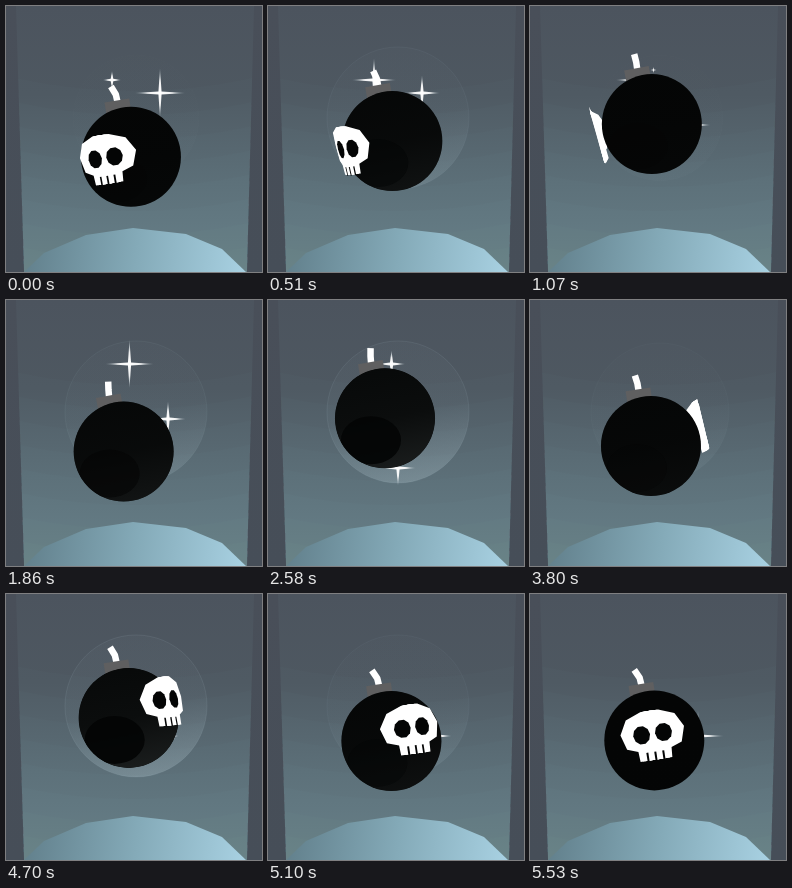
An HTML page with a canvas that plays this animation: 256x266 px, repeating every 5550 ms.

```html
<!DOCTYPE html>
<html>
<head>
<meta charset="utf-8">
<style>
html, body { margin: 0; width: 100%; height: 100%; overflow: hidden; background: #484f59; }
canvas { display: block; }
</style>
</head>
<body>
<canvas id="stage" width="256" height="266"></canvas>
<script>
const ctx = document.getElementById('stage').getContext('2d');
const LOOP = 5550, RAD = Math.PI / 180, BLACK = '#040505';
const wave = degrees => Math.cos(degrees * RAD);

// x, y, time of full brightness
const sparkles = [[154, 87, .1], [106, 74, .75], [162, 119, 1.45], [123.5, 64, 2], [130, 168, 3], [168, 142, 5.6]];

// Right half of the skull, mirrored for the left
const half = [[9, -31], [24.5, -25], [32, -11], [27.5, 4], [16.7, 8], [16, 18]];
const skull = [...half, ...half.map(([u, v]) => [-u, v]).reverse()];

function poly(points, fill) {
  ctx.beginPath();
  points.forEach(p => ctx.lineTo(...p));
  ctx.closePath();
  ctx.fillStyle = fill;
  ctx.fill();
}

function oval(x, y, rx, ry, fill) {
  ctx.beginPath();
  ctx.ellipse(x, y, rx, ry, 0, 0, 7);
  ctx.fillStyle = fill;
  ctx.fill();
}

function gradient(x0, y0, x1, y1, ...colors) {
  const g = ctx.createLinearGradient(x0, y0, x1, y1);
  colors.forEach((c, i) => g.addColorStop(i / (colors.length - 1), c));
  return g;
}

function drawRoom() {
  ctx.fillStyle = gradient(0, 0, 0, 266, '#494f59', '#464e58');
  ctx.fillRect(0, 0, 256, 266);
  ctx.save();
  poly([[10, 0], [248, 0], [241, 266], [18, 266]], gradient(0, 0, 0, 266, '#4c545e', '#4e5861', '#586770', '#61737c'));
  ctx.clip();
  ctx.fillStyle = 'rgba(140,175,190,.02)';
  for (let y = 70; y < 250; y += 24) {
    ctx.beginPath();
    ctx.moveTo(0, y);
    ctx.quadraticCurveTo(128, y + 30, 256, y);
    ctx.lineTo(256, 266);
    ctx.lineTo(0, 266);
    ctx.fill();
  }
  ctx.restore();
  poly([[18, 266], [38, 247], [80, 229], [127, 222], [180, 228], [216, 243], [240, 266]],
    gradient(20, 235, 240, 262, '#62808c', '#84aab8', '#a8d1e2'));
}

function drawBubble(glow) {
  const r = 60 + 11 * Math.min(1, glow * 3);
  ctx.globalAlpha = glow;
  oval(130, 112, r, r, gradient(115, 42, 140, 184, 'rgba(190,215,225,.03)', 'rgba(190,215,225,.04)', 'rgba(200,220,228,.28)'));
  ctx.strokeStyle = 'rgba(190,210,220,.1)';
  ctx.lineWidth = 1;
  ctx.stroke();
  ctx.globalAlpha = 1;
}

function drawSparkle([x, y, peak], t) {
  const s = 27 * Math.max(0, 1 - Math.abs(t - peak)) ** .8;
  if (!s) return;
  const g = ctx.createRadialGradient(x, y, 0, x, y, s);
  g.addColorStop(0, '#fff');
  g.addColorStop(.5, 'rgba(255,255,255,.9)');
  g.addColorStop(1, 'rgba(220,235,240,.3)');
  const waist = Math.min(2.2, s * .2);
  const star = Array.from({ length: 8 }, (_, i) => {
    const r = i % 2 ? waist : s;
    return [x + r * wave(i * 45), y + r * wave(i * 45 - 90)];
  });
  poly(star, g);
}

// A curved plate riding on the ball
function drawSkull(spin) {
  const sin = Math.sin(spin), cos = Math.cos(spin);
  const wrap = ([u, v]) => {
    const across = u - v * .09, depth = 55.5 - across * across / 108;
    return [depth * sin + across * cos, v + u * .09 + 1 - 3 * sin];
  };
  const ring = x => Array.from({ length: 10 }, (_, i) =>
    wrap([x + 8.5 * wave(i * 36), -8 + 9.2 * wave(i * 36 - 90)]));

  ctx.strokeStyle = '#fff';
  ctx.lineWidth = 1.5;
  for (let k = 1; k > 0; k -= .15) {
    poly(skull.map(([u, v]) => wrap([u * k, v])), '#fff');
    if (cos < .1) ctx.stroke();
  }
  if (cos < .1) return;
  [-11, 11].forEach(x => poly(ring(x), BLACK));
  for (let u = -8; u <= 8; u += 8)
    poly([[u - 1, 10], [u + 1, 10], [u + 1, 19], [u - 1, 19]].map(wrap), BLACK);
}

function drawBall(glow) {
  ctx.save();
  oval(0, 0, 50, 50, BLACK);
  ctx.clip();
  ctx.globalAlpha = glow;
  oval(0, 0, 50, 50, gradient(-10, -50, 10, 50, '#080a0a', '#0c0e0e', '#1c1f1f'));
  oval(-14, 22, 30, 24, BLACK);
  ctx.restore();
}

function drawFuse(tilt, spin) {
  ctx.save();
  ctx.translate(53 * Math.sin(tilt), -53 * Math.cos(tilt));
  const tip = -4 - 3.5 * Math.cos(spin - 10 * RAD);
  ctx.beginPath();
  ctx.moveTo(0, -3);
  ctx.lineTo(-.5 + tip * .2, -11);
  ctx.lineTo(tip, -19);
  ctx.strokeStyle = '#fff';
  ctx.lineWidth = 6.5;
  ctx.lineJoin = 'round';
  ctx.stroke();
  ctx.rotate(tilt * .65);
  ctx.fillStyle = '#5f5f60';
  ctx.fillRect(-12.5, -5, 25, 11);
  ctx.restore();
}

function draw(t) {
  const turn = 60 * t;
  const spin = (-29 - turn) * RAD;
  const tilt = (-14.5 - 1.5 * Math.sin(turn * RAD)) * RAD;
  const glow = (.5 + .5 * wave((t - 2.35) / 2.15 * 360)) * Math.min(1, .1 + t);
  const facing = Math.cos(spin);
  const face = () => {
    ctx.save();
    ctx.rotate(tilt);
    drawSkull(spin);
    ctx.restore();
  };

  drawRoom();
  drawBubble(glow);
  sparkles.forEach(s => drawSparkle(s, t));

  ctx.save();
  ctx.translate(121.2 + 3.7 * wave(turn + 24) + wave(2 * turn - 70), 134.2 + 17.5 * wave((t - .09) / 1.74 * 360));
  drawFuse(tilt, spin);
  if (facing < .1 && facing > -.4) face();
  drawBall(glow);
  if (facing >= .1) face();
  ctx.restore();
}

function tick() {
  draw(performance.now() % LOOP / 1000);
  requestAnimationFrame(tick);
}
tick();
</script>
</body>
</html>
```
